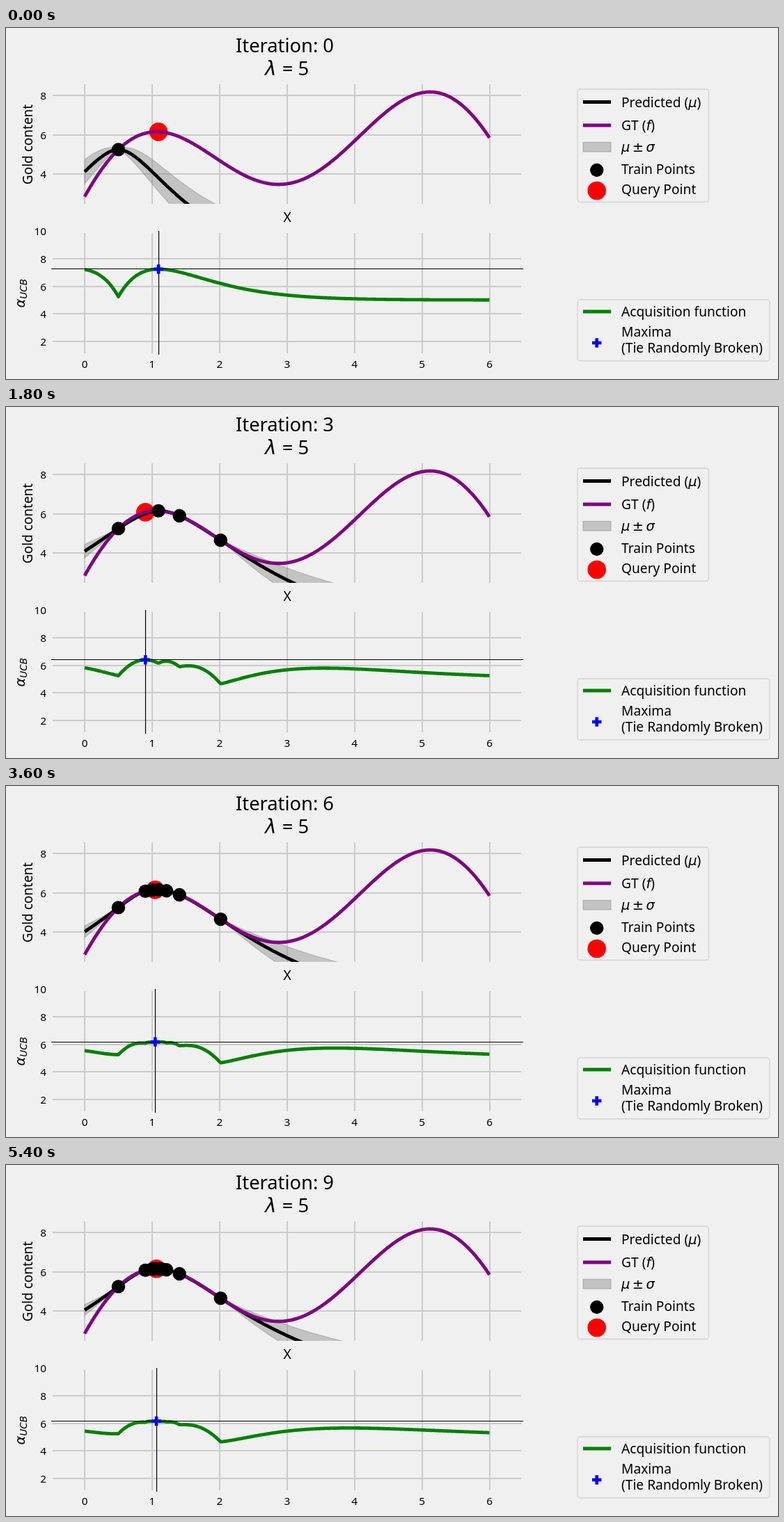
An HTML page with a canvas that plays this animation: 1109x505 px, repeating every 6 s.

```html
<!DOCTYPE html>
<html lang="en">
<head>
<meta charset="utf-8">
<title>Upper confidence bound search</title>
<style>
  html, body { margin: 0; width: 100%; height: 100%; overflow: hidden; background: #f0f0f0; }
  canvas { display: block; }
</style>
</head>
<body>
<canvas id="stage" width="1109" height="505"></canvas>
<script>
const ctx = document.getElementById('stage').getContext('2d');
const SANS = '"Noto Sans", "Open Sans", sans-serif';
const MATH = '"DejaVu Sans", sans-serif';
const STEP_MS = 600, LAMBDA = 5, LINE = 4.8;
const START = 0.5;
const QUERIES = [1.094, 2.015, 1.405, 0.9, 1.213, 1.0, 1.045, 1.145, 1.115, 1.063];
const XS = Array.from({ length: 601 }, (_, i) => i / 100);

const truth = x => 2 * (x - 3) * Math.sin(x - 3) + x / 2 + 2;
const px = x => 113 + 96.92 * x;
const topY = v => 97 + 28.25 * (8 - v);
const lowY = v => 332 + 19.78 * (8 - v);

// Gaussian process with a Matern 3/2 kernel
function matern(d, scale) {
  const a = Math.sqrt(3) * Math.abs(d) / scale;
  return (1 + a) * Math.exp(-a);
}

function cholesky(xs, scale) {
  const L = xs.map(() => []);
  xs.forEach((xi, i) => {
    for (let j = 0; j <= i; j++) {
      let s = matern(xi - xs[j], scale) + (i === j ? 1e-10 : 0);
      for (let k = 0; k < j; k++) s -= L[i][k] * L[j][k];
      L[i][j] = i === j ? Math.sqrt(Math.max(s, 1e-14)) : s / L[j][j];
    }
  });
  return L;
}

function forward(L, b) {
  const z = [];
  b.forEach((v, i) => {
    for (let k = 0; k < i; k++) v -= L[i][k] * z[k];
    z.push(v / L[i][i]);
  });
  return z;
}

const dot = (a, b) => a.reduce((s, v, i) => s + v * b[i], 0);

function likelihood(xs, ys, scale) {
  const L = cholesky(xs, scale), z = forward(L, ys);
  return -dot(z, z) / 2 - L.reduce((s, row, i) => s + Math.log(row[i]), 0);
}

function bestScale(xs, ys) {
  if (xs.length < 2) return 1;
  let best = 1, top = -Infinity;
  for (let i = 0; i <= 400; i++) {
    const scale = 0.5 * 16 ** (i / 400), value = likelihood(xs, ys, scale);
    if (value > top) { top = value; best = scale; }
  }
  return best;
}

function fit(xs) {
  const ys = xs.map(truth), scale = bestScale(xs, ys);
  const L = cholesky(xs, scale), z = forward(L, ys);
  return x => {
    const w = forward(L, xs.map(t => matern(x - t, scale)));
    const mu = dot(w, z), sd = Math.sqrt(Math.max(0, 1 - dot(w, w)));
    return { mu, sd, ucb: mu + LAMBDA * sd };
  };
}

const scenes = QUERIES.map((query, i) => {
  const train = [START, ...QUERIES.slice(0, i)];
  const predict = fit(train);
  return { train, query, curve: XS.map(predict), best: predict(query).ucb };
});

// Drawing helpers
function line(points, color, width) {
  ctx.beginPath();
  points.forEach(([x, y]) => ctx.lineTo(x, y));
  ctx.strokeStyle = color;
  ctx.lineWidth = width;
  ctx.stroke();
}

function disc(x, y, r, color) {
  ctx.beginPath();
  ctx.arc(x, y, r, 0, 2 * Math.PI);
  ctx.fillStyle = color;
  ctx.fill();
}

function plus(x, y) {
  ctx.fillStyle = '#00f';
  ctx.fillRect(x - 6.7, y - 2.3, 13.4, 4.6);
  ctx.fillRect(x - 2.3, y - 6.7, 4.6, 13.4);
}

function text(str, x, y, size, align = 'left', font = SANS) {
  ctx.font = font === SANS ? `${size}px ${SANS}` : `italic ${size}px ${MATH}`;
  ctx.textAlign = align;
  ctx.fillStyle = '#000';
  ctx.fillText(str, x, y);
  return x + ctx.measureText(str).width;
}

const math = (str, x, y, size) => text(str, x, y, size, 'left', MATH);

function rotated(x, y, draw) {
  ctx.save();
  ctx.translate(x, y);
  ctx.rotate(-Math.PI / 2);
  draw();
  ctx.restore();
}

function clipped(top, bottom, draw) {
  ctx.save();
  ctx.beginPath();
  ctx.rect(66, top, 676, bottom - top);
  ctx.clip();
  draw();
  ctx.restore();
}

function band() {
  ctx.fillStyle = ctx.strokeStyle = 'rgba(128,128,128,0.4)';
  ctx.lineWidth = 1.3;
  ctx.fill();
  ctx.stroke();
}

function grid(top, bottom, values, toY) {
  const color = '#cbcbcb';
  for (let i = 0; i <= 6; i++) {
    const x = Math.round(px(i));
    line([[x, top], [x, bottom]], color, 2);
  }
  for (const v of values) {
    const y = Math.round(toY(v));
    line([[67, y], [740, y]], color, 2);
    text(v, 58, y + 5.5, 15.3, 'right');
  }
}

function frameBox(x, y, w, h) {
  ctx.beginPath();
  ctx.roundRect(x, y, w, h, 4);
  ctx.strokeStyle = '#d3d3d3';
  ctx.lineWidth = 1.3;
  ctx.stroke();
}

function legends() {
  const x = 884, size = 19.2, key = (y, color) => line([[829, y], [869, y]], color, LINE);

  frameBox(821, 88, 188.5, 162.5);
  key(106.5, '#000');
  let end = text('Predicted (', x, 113.5, size);
  text(')', math('μ', end, 113.5, 19.4), 113.5, size);
  key(140, '#800080');
  end = text('GT (', x, 146.5, size);
  text(')', math('f', end, 146.5, 19.4), 146.5, size);
  ctx.beginPath();
  ctx.rect(829, 164.5, 40, 13.5);
  band();
  end = math('μ', x, 177.5, 19.4) + 3.5;
  ctx.font = `19.4px ${MATH}`;
  ctx.fillText('±', end, 177.5);
  math('σ', end + ctx.measureText('±').width + 3.5, 177.5, 19.4);
  disc(848.7, 204.5, 9.7, '#000');
  text('Train Points', x, 209.5, size);
  disc(848.7, 234, 13.3, '#f00');
  text('Query Point', x, 238.5, size);

  frameBox(821, 391, 276, 88);
  key(408, '#008000');
  text('Acquisition function', x, 414.5, size);
  plus(848.7, 453);
  text('Maxima', x, 444, size);
  text('(Tie Randomly Broken)', x, 467, size);
}

function labels(index) {
  text('Iteration: ' + index, 400.5, 35, 27.3, 'center');
  math('λ', 372, 67.5, 27.8);
  text('= 5', 435, 67.5, 27.3, 'right');
  text('X', 404, 279, 19.2, 'center');
  rotated(37.5, 167.5, () => text('Gold content', 0, 0, 19, 'center'));
  rotated(27, 402.5, () => math('UCB', math('α', 0, 0, 19.4), 3, 13.6));
  for (let i = 0; i <= 6; i++) text(i, px(i), 489, 15.3, 'center');
  text(10, 58, 297.5, 15.3, 'right');
}

function model({ train, query, curve }) {
  const path = f => XS.map((x, i) => [px(x), topY(f(x, curve[i]))]);
  const upper = path((x, p) => p.mu + p.sd);
  const lower = path((x, p) => p.mu - p.sd).reverse();
  ctx.beginPath();
  [...upper, ...lower].forEach(([x, y]) => ctx.lineTo(x, y));
  ctx.closePath();
  band();
  disc(px(query), topY(truth(query)), 13.3, '#f00');
  line(path((x, p) => p.mu), '#000', LINE);
  line(path(truth), '#800080', LINE);
  train.forEach(x => disc(px(x), topY(truth(x)), 9.7, '#000'));
}

function acquisition({ query, curve, best }) {
  const x = px(query), y = lowY(best);
  line(XS.map((t, i) => [px(t), lowY(curve[i].ucb)]), '#008000', LINE);
  const cx = Math.floor(x) + 0.5, cy = Math.floor(y) + 0.5;
  line([[cx, 292], [cx, 470]], '#000', 1.2);
  line([[65, cy], [743, cy]], '#000', 1.2);
  plus(x, y);
}

function render(index) {
  const scene = scenes[index];
  ctx.fillStyle = '#f0f0f0';
  ctx.fillRect(0, 0, 1109, 505);
  ctx.lineJoin = 'round';
  grid(81, 253, [4, 6, 8], topY);
  grid(295, 468, [2, 4, 6, 8], lowY);
  clipped(81, 253, () => model(scene));
  acquisition(scene);
  labels(index);
  legends();
}

const begin = performance.now();
let shown = -1;
function tick() {
  const index = Math.floor((performance.now() - begin) / STEP_MS) % scenes.length;
  if (index !== shown) render(shown = index);
  requestAnimationFrame(tick);
}
tick();
</script>
</body>
</html>
```
